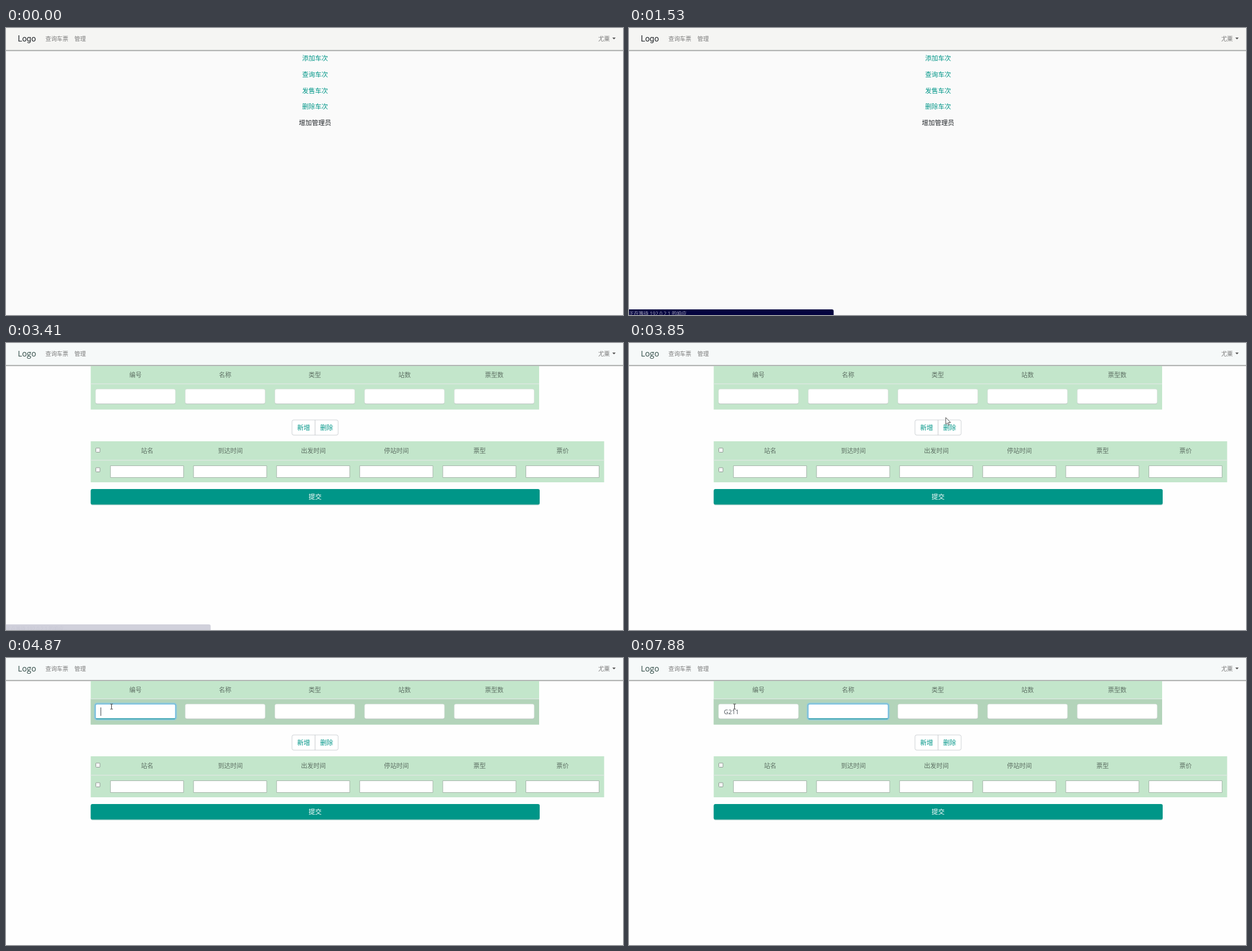
An HTML page with a canvas for the animation above (8 s loop, 1096 px wide and 511 px high).

```html
<!DOCTYPE html>
<html lang="zh-CN">
<head>
<meta charset="utf-8">
<style>
html, body { margin: 0; width: 100%; height: 100%; overflow: hidden; background: #fff; }
canvas { display: block; }
</style>
</head>
<body>
<canvas id="stage" width="1096" height="511"></canvas>
<script>
const ctx = document.getElementById('stage').getContext('2d');
const LOOP = 8000, TEAL = '#009688', GREEN = '#c3e6cb';
const CJK = '"Open Sans", "Noto Sans CJK SC", "Noto Sans CJK", sans-serif';

const ramp = (t, from, to) => Math.min(1, Math.max(0, (t - from) / (to - from)));
const ease = p => p * p * (3 - 2 * p);
const within = (p, x, y, w, h) => p && p.x >= x && p.x < x + w && p.y >= y && p.y < y + h;

function rect(x, y, w, h, color) {
  ctx.fillStyle = color;
  ctx.fillRect(x, y, w, h);
}

function box(x, y, w, h, radius, fill, stroke, lineWidth = 1) {
  ctx.beginPath();
  ctx.roundRect(x, y, w, h, radius);
  if (fill) { ctx.fillStyle = fill; ctx.fill(); }
  if (stroke) { ctx.strokeStyle = stroke; ctx.lineWidth = lineWidth; ctx.stroke(); }
}

// Text placed by its vertical centre
function text(str, x, y, size, color, align = 'center', font = CJK) {
  ctx.font = `${size}px ${font}`;
  ctx.textAlign = align;
  ctx.fillStyle = color;
  ctx.fillText(str, x, y + size * 0.37);
}

function shape(points, x, y, fill, stroke) {
  ctx.beginPath();
  for (let i = 0; i < points.length; i += 2) ctx.lineTo(x + points[i], y + points[i + 1]);
  ctx.closePath();
  ctx.fillStyle = fill;
  ctx.fill();
  if (stroke) { ctx.strokeStyle = stroke; ctx.lineWidth = 0.8; ctx.stroke(); }
}

// Pointer strokes: [time, x, y], eased between neighbours
const strokes = [
  [[150, 1014, 497], [480, 720, 150], [700, 596, 13], [890, 556, 50], [990, 556, 50],
   [1130, 551, 53], [1290, 551, 53], [1530, 598, 24]],
  [[3480, 598, 8], [3700, 588, 98], [3970, 545, 157], [4100, 545, 157], [4250, 453, 157],
   [4420, 453, 157], [4510, 211.5, 87.5], [4600, 187.5, 86.5], [8001, 187.5, 86.5]]
];

function pointerAt(t) {
  for (const path of strokes) {
    const i = path.findIndex(p => t < p[0]);
    if (i < 1) continue;
    const [a, b] = [path[i - 1], path[i]], p = ease(ramp(t, a[0], b[0]));
    return { x: a[1] + (b[1] - a[1]) * p, y: a[2] + (b[2] - a[2]) * p };
  }
}

function drawPointer({ x, y }, kind) {
  if (kind === 'beam') {
    rect(x - 0.5, y - 4.5, 1, 9, '#333');
    rect(x - 2.5, y - 5, 5, 1, '#555');
    rect(x - 2.5, y + 4, 5, 1, '#555');
  } else if (kind === 'hand') {
    shape([-1, 0, 1, 0, 1, 5, 6, 6, 7, 8, 6, 13, 0, 13, -4, 8, -3, 7, -1, 9], x, y, '#fff', '#222');
  } else {
    shape([0, 0, 0, 12, 2.8, 9.5, 4.7, 13.7, 6.5, 13, 4.7, 8.8, 8.5, 8.8], x, y, '#fff', '#222');
  }
}

function navbar(bg, logoColor, logoFont) {
  rect(0, 0, 1096, 39, bg);
  rect(0, 39, 1096, 1, '#b0b3b1');
  rect(0, 40, 1096, 1, '#b4b5b5');
  rect(0, 41, 1096, 1, 'rgba(0,0,0,.07)');
  text('Logo', 21, 19, 14.3, logoColor, 'left', logoFont);
  text('查询车票', 70, 19, 10.2, '#7c7c7c', 'left');
  text('管理', 121.5, 19, 10.2, '#7c7c7c', 'left');
  text('尤粟', 1052, 19, 10.3, '#7c7c7c', 'left');
  shape([0, 0, 6, 0, 3, 3.2], 1077, 17, '#555');
}

function menuPage(pointer) {
  rect(0, 0, 1096, 511, '#fafafa');
  navbar('#f5f5f3', '#212529', 'Roboto, sans-serif');
  let overLink = false;
  ['添加车次', '查询车次', '发售车次', '删除车次'].forEach((label, i) => {
    const y = 54 + i * 28.7, over = within(pointer, 526, y - 8, 46, 16);
    text(label, 549, y, 11.5, over ? '#004a43' : TEAL);
    if (over) rect(526, y + 6, 46, 1, '#004a43');
    overLink ||= over;
  });
  text('增加管理员', 549, 168.5, 11.5, '#212529');
  if (pointer) drawPointer(pointer, overLink ? 'hand' : 'arrow');
}

function focusRing(x, amount) {
  if (!amount) return;
  ctx.globalAlpha = amount;
  box(x - 1, 81, 144, 28.5, 4, null, 'rgba(130,200,235,.45)', 4);
  box(x - 0.5, 81.7, 143, 27, 3, null, '#72bbdf', 1.6);
  ctx.globalAlpha = 1;
  const w = 140 * amount;
  rect(x + 71 - w / 2, 107.5, w, 1.4, '#1c98a4');
}

function caret(x) { rect(x, 88, 1, 15, '#3f464c'); }

function imePopup() {
  rect(173, 104, 66, 32.5, '#2b8bdd');
  rect(207.5, 105, 30.5, 30.5, '#fff');
  rect(174, 105, 33.5, 30.5, '#0078d7');
  text('G', 190, 121, 14, '#fff');
  ctx.strokeStyle = ctx.fillStyle = '#111';
  ctx.lineWidth = 1.1;
  ctx.beginPath();
  ctx.arc(223, 120.5, 6.2, 0, 7);
  ctx.moveTo(226.3, 122);
  ctx.arc(223, 121.5, 3.4, 0.15, Math.PI - 0.15);
  ctx.stroke();
  rect(220, 117.5, 1.5, 1.7, '#111');
  rect(224.5, 117.5, 1.5, 1.7, '#111');
}

function firstField(t) {
  const typed = t < 5380 ? '' : t < 6220 ? 'G' : t < 6430 ? 'G2' : t < 6560 ? 'G21' : 'G211';
  text(typed, 168.5, 96.3, 10.9, '#495057', 'left');
  const end = 168.5 + ctx.measureText(typed).width;
  const composing = t >= 5380 && t < 6060;
  if (composing) rect(169, 102, 8, 1, '#495057');
  if (t >= 4610 && t < 5140 || t >= 6140 && t < 7110) caret(Math.floor(end));
  ctx.globalAlpha = ramp(t, 5340, 5480) * (1 - ramp(t, 6060, 6140));
  if (t >= 5380 && t < 6140) imePopup();
  ctx.globalAlpha = 1;
}

function trainTable(t, pointer) {
  const over = within(pointer, 150.5, 73, 796.5, 45);
  rect(150.5, 41, 796.5, 77.5, GREEN);
  if (over) rect(150.5, 73, 796.5, 45.5, '#b3d4ba');
  rect(150.5, 72, 796.5, 1.3, '#dee8e2');
  let overField = false;
  ['编号', '名称', '类型', '站数', '票型数'].forEach((label, i) => {
    const x = 159 + i * 159.3;
    text(label, x + 71, 56.5, 11, '#5d6f63');
    box(x, 82.5, 142, 26.5, 3, '#b3bfba');
    box(x, 82, 142, 26, 3, '#fff', '#d5ddd9', 0.7);
    overField ||= within(pointer, x, 82, 142, 26);
  });
  focusRing(159, ease(ramp(t, 4610, 4880)) * (1 - ease(ramp(t, 7330, 7600))));
  focusRing(318.3, ease(ramp(t, 7330, 7630)));
  if (t >= 7360 && t < 7880) caret(328);
  return overField;
}

function editButtons(pointer) {
  const over = within(pointer, 508, 137, 41, 27);
  box(508, 137, 82, 27, 3, '#fff', '#ced2d5');
  if (over) box(508.5, 137.5, 40.5, 26, [3, 0, 0, 3], '#ececec');
  rect(548.5, 137, 1, 27, '#c4c8ca');
  text('新增', 528.7, 151, 11.5, TEAL);
  text('删除', 569.5, 151, 11.5, TEAL);
  return over;
}

function stopTable() {
  rect(150.5, 175, 912, 73, GREEN);
  rect(150.5, 208, 912, 1.3, '#dee8e2');
  for (const y of [187, 222]) box(159.5, y, 7.5, 7.5, 1, '#f3f5f4', '#929a95');
  ['站名', '到达时间', '出发时间', '停站时间', '票型', '票价'].forEach((label, i) => {
    const x = 185.5 + i * 147.6;
    text(label, x + 65.3, 192, 11, '#5d6f63');
    box(x, 218.5, 130, 21, 0, '#fff', '#a5b5aa');
  });
}

function formPage(t, pointer) {
  rect(0, 0, 1096, 511, '#fefefe');
  navbar('#f6f9f9', '#2f4a45', CJK);
  const overField = trainTable(t, pointer);
  const overButton = editButtons(pointer);
  stopTable();
  box(150.5, 261.3, 797.5, 27.5, 3, '#a9cfca');
  box(150.5, 260, 797.5, 27.5, 3, TEAL);
  text('提交', 549, 274, 11.6, '#fff');
  firstField(t);
  if (pointer) drawPointer(pointer, overField ? 'beam' : overButton ? 'hand' : 'arrow');
}

function statusBar(t) {
  const alpha = ramp(t, 960, 1130) * (1 - ramp(t, 3280, 3440));
  if (t < 990 || !alpha) return;
  ctx.globalAlpha = alpha;
  box(-1, 501, 364.5, 14, [0, 3, 0, 0], '#04043f');
  text(t < 1290 ? '192.0.2.1/train/add' : '正在等待 192.0.2.1 的响应...', 0, 508.7, 8.7, '#a9a9bd', 'left');
  ctx.globalAlpha = 1;
}

function draw() {
  const t = performance.now() % LOOP, pointer = pointerAt(t);
  if (t < 2990) menuPage(pointer);
  else formPage(t, pointer);
  statusBar(t);
  requestAnimationFrame(draw);
}
draw();
</script>
</body>
</html>
```
